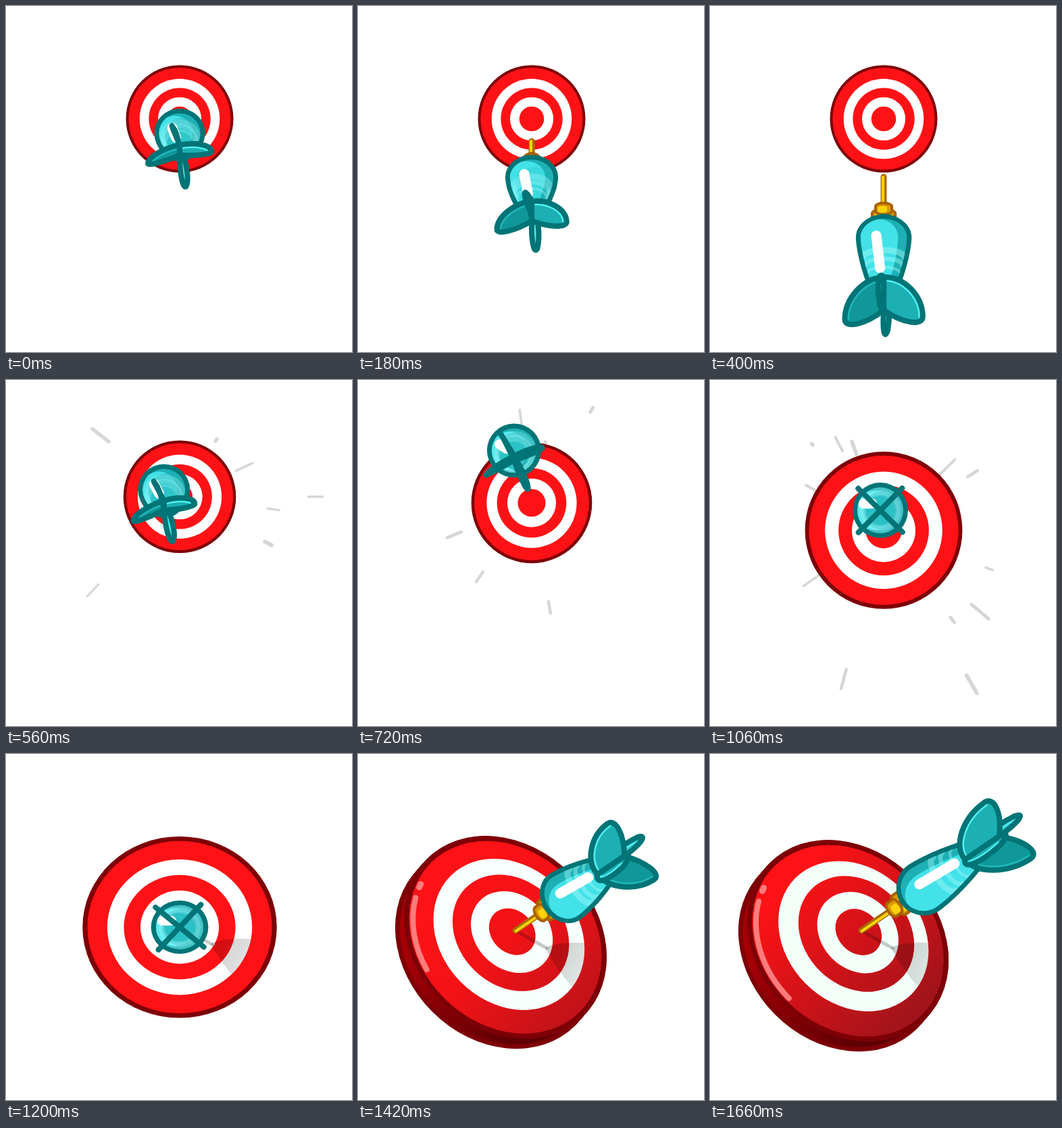
Write an HTML page with a canvas that moves like this. It is 512 px wide and 512 px high and loops after 1.68 s.

```html
<!DOCTYPE html>
<html lang="en">
<head>
<meta charset="utf-8">
<title>Dart and target</title>
<style>
  html, body { margin: 0; width: 100%; height: 100%; overflow: hidden; background: #fff; }
  canvas { display: block; width: 512px; height: 512px; }
</style>
</head>
<body>
<canvas id="stage" width="512" height="512"></canvas>
<script>
const ctx = document.getElementById('stage').getContext('2d');
const LOOP = 1680, STEP = 20, TAU = Math.PI * 2;
const TEAL = '#007476', MAROON = '#7d0006';
const HIT = 1130, LEAN = 1200, SETTLE = 1420;

const progress = (t, from, to) => Math.max(0, Math.min(1, (t - from) / (to - from)));
const ease = (t, from, to) => {
  const p = progress(t, from, to);
  return p * p * (3 - 2 * p);
};
const mix = (a, b, p) => a + (b - a) * p;

let seed = 7;
const rand = () => (seed = seed * 16807 % 2147483647) / 2147483647;
const between = (a, b) => mix(a, b, rand());

// Streaks fly outwards and stay clear of the stage edges
const streaks = Array.from({ length: 36 }, (_, i) => {
  const angle = i * 2.4;
  return {
    angle,
    time: between(540, 1090),
    dist: between(100, 190 + 70 * Math.sin(angle)),
    len: between(15, 38),
    width: between(3, 6)
  };
});

function targetPose(t) {
  const p = progress(t, 440, LEAN);
  const zoom = 59.5 * (.4 * p + .6 * p ** 3.5);
  const tilt = ease(t, LEAN, SETTLE);
  const settle = 1 - (1 - progress(t, SETTLE, 1660)) ** 2;
  return {
    x: 257 - 39 * tilt - 14 * settle,
    y: 167 + 1.5 * zoom + 15 * tilt + 5 * settle,
    radius: 79.5 + zoom + 25 * tilt - settle,
    ratio: 1 - .18 * tilt,
    squash: .034 * (ease(t, HIT, LEAN) - ease(t, LEAN, 1260)),
    shade: .65 * tilt + .35 * settle,
    tilt, settle
  };
}

function dartPose(t, { y: targetY, tilt, settle }) {
  const pull = ease(t, 0, 400) - ease(t, 400, 560);
  const rise = ease(t, 400, 880);
  const drop = ease(t, 880, HIT);
  const drift = ease(t, 400, 600) - drop;
  const spin = ease(t, LEAN, 1270);
  const flightY = 161 + 92 * pull - 93 * rise;
  return {
    x: 257 - 26 * drift - 24 * tilt - 9 * settle,
    y: mix(flightY, targetY, drop) - 10 * tilt - 5 * settle,
    length: .22 * (1 - rise * rise) + .51 * pull + .723 * tilt + .192 * settle,
    aspect: .92 + .08 * rise - .59 * pull - .6 * tilt,
    scale: .9 + .1 * rise + .11 * pull,
    finSize: 52 - 2 * rise + 10 * pull + 9 * tilt,
    heading: 1.57 - 2.17 * spin,
    roll: .2 - .1 * pull + .34 * rise + .31 * drop - 2.2 * spin,
    gloss: mix(11 + 14 * rise, -8, tilt)
  };
}

function fill(path, color) {
  ctx.fillStyle = color;
  ctx.fill(path);
}

function stroke(path, color, width) {
  ctx.strokeStyle = color;
  ctx.lineWidth = width;
  ctx.stroke(path);
}

function line(x1, y1, x2, y2, color, width) {
  const p = new Path2D();
  p.moveTo(x1, y1);
  p.lineTo(x2, y2);
  stroke(p, color, width);
}

function drawStreaks(t, cx, cy) {
  for (const s of streaks) {
    const p = (t - s.time) / 90;
    if (Math.abs(p) >= 1) continue;
    const from = s.dist + 35 * p, to = from + s.len * (1 - p * p);
    const c = Math.cos(s.angle), n = Math.sin(s.angle);
    line(cx + c * from, cy + n * from, cx + c * to, cy + n * to, '#d6d6d6', s.width);
  }
}

function drawTarget({ x, y, radius, ratio, tilt, settle, shade }, dart, shadow) {
  const face = radius * .95;
  const oval = (r, dx = 0, dy = 0, from = 0, to = TAU) => {
    const p = new Path2D();
    p.ellipse(x + dx, y + dy, r, r * ratio, Math.PI / 4, from, to);
    return p;
  };

  if (tilt > .01) {
    const side = ctx.createLinearGradient(x - 100, y, x + 20, y + 150);
    side.addColorStop(0, '#a30006');
    side.addColorStop(1, '#5e0004');
    for (const [r, color] of [[radius, MAROON], [radius * .955, side]]) {
      for (let i = 0; i <= 15; i++) fill(oval(r, -tilt * i * .87, tilt * i), color);
    }
  }
  fill(oval(radius), MAROON);

  const reach = face * .72;
  const shading = ctx.createLinearGradient(x - reach, y - reach, x + reach, y + reach);
  shading.addColorStop(.1, 'rgba(125,20,28,0)');
  shading.addColorStop(.5, `rgba(125,20,28,${.33 * shade ** 3})`);
  shading.addColorStop(1, `rgba(125,20,28,${.75 * shade})`);
  const white = `rgb(${255 - 11 * shade},255,${255 - 5 * shade})`;
  const ring = f => {
    const shift = shade * (1 - f ** 3);
    return oval(face * f, 16 * shift, -13 * shift);
  };
  [1, .785, .605, .425, .242].forEach((f, i) => {
    fill(ring(f), i % 2 ? white : '#ff1216');
    if (i % 2 === 0) fill(ring(f), shading);
  });

  if (shadow > 0) {
    ctx.save();
    ctx.clip(ring(.785));
    ctx.translate(dart.x, dart.y);
    ctx.globalAlpha = shadow;
    line(0, 0, 46, 26, 'rgba(0,0,0,.2)', 5);
    const wedge = new Path2D('M44 25Q75 12 130 22L98 98Q62 62 44 25Z');
    const soft = ctx.createLinearGradient(44, 25, 110, 60);
    soft.addColorStop(0, 'rgba(0,0,0,.2)');
    soft.addColorStop(1, 'rgba(0,0,0,.09)');
    fill(wedge, soft);
    ctx.restore();
  }

  if (tilt > .3) {
    ctx.globalAlpha = (tilt - .3) / .7;
    stroke(oval(face * .96, 0, 0, 1.9 - .32 * settle, 2.7), '#ff7c7c', 8);
    stroke(oval(face * .96, 0, 0, 2.83, 2.87), '#ff7c7c', 9);
    ctx.globalAlpha = 1;
  }
}

const BELLY = 122, TAIL = 252, GIRTH = 34;

function bodyRadius(u) {
  if (u < BELLY) return GIRTH * Math.sqrt(Math.max(0, 1 - ((BELLY - u) / GIRTH) ** 2));
  return GIRTH * (1 - .8 * ((u - BELLY) / (TAIL - BELLY)) ** 1.6);
}

function drawDart({ x, y, length: k, aspect: c, scale, finSize, heading, roll, gloss }) {
  // Solid of revolution: union of the projected rings
  const solid = (from, to, radius, grow = 0, dy = 0) => {
    const p = new Path2D();
    for (let i = 0; i <= 70; i++) {
      const u = mix(from, to, i / 70), r = radius(u) * scale;
      const rx = r * c + grow;
      p.moveTo(u * k + rx, dy);
      p.ellipse(u * k, dy, rx, r + grow, 0, 0, TAU);
    }
    return p;
  };

  ctx.save();
  ctx.translate(x, y);
  ctx.rotate(heading);

  const thin = Math.min(1, k * 4);
  line(0, 0, 60 * k, 0, '#a86c00', 9 * thin);
  line(0, 1, 60 * k, 1, '#ffd40a', 4 * thin);
  for (const [from, to, r] of [[74, 94, 15], [60, 69, 10]]) {
    fill(solid(from, to, () => r, 4), '#a86200');
    fill(solid(from, to, () => r), '#d99a04');
    fill(solid(from + 2, to, () => r * .7, 0, 2), '#ffd40a');
  }

  const front = BELLY - GIRTH;
  const body = solid(front, TAIL, bodyRadius);
  fill(solid(front, TAIL, bodyRadius, 7), TEAL);
  fill(body, '#1eb0b5');
  ctx.save();
  ctx.clip(body);
  fill(solid(front, TAIL, u => bodyRadius(u) * .86, 0, 8 * scale), '#42e2e8');
  if (c > .5) {
    ctx.globalAlpha = (c - .5) * 1.3;
    fill(solid(BELLY + 8, TAIL, u => bodyRadius(u) * .85, 0, -3), '#1eb0b5');
    ctx.globalAlpha = 1;
  }
  const half = Math.PI / 2 * (1 + c ** 4);
  for (let i = 0; i < 3; i++) {
    const u = 162 + 16 * i, r = bodyRadius(u) * scale, p = new Path2D();
    p.ellipse(u * k, 0, r * c, r, 0, Math.PI - half, Math.PI + half);
    stroke(p, `rgba(170,250,250,${.5 - .25 * c})`, 9 - 2.5 * i);
  }
  line(120 * k - 10 * c * (1 - k), gloss, 186 * k - 10 * c * (1 - k), gloss * .5, '#fff', 15);
  ctx.restore();

  [0, 1, 2, 3].map(i => roll + i * Math.PI / 2)
    .sort((a, b) => Math.cos(a) - Math.cos(b))
    .forEach((angle, rank) => drawFin(angle, rank, k, c, (finSize - 4) / 60));
  ctx.restore();
}

// Ranks run from the rear fin (0) to the one nearest the viewer (3)
function drawFin(angle, rank, k, c, size) {
  const sin = Math.sin(angle), cos = Math.cos(angle);
  const thick = 5 * Math.min(1, k * 5) * cos;
  const at = (u, r, side = 0) => [u * k - r * size * cos * c, r * size * sin + side * thick];
  const edge = new Path2D();
  edge.moveTo(...at(203, 0));
  edge.bezierCurveTo(...at(203, 32, 1), ...at(243, 60, 1), ...at(285, 60));
  const leaf = new Path2D(edge);
  leaf.bezierCurveTo(...at(306, 60, -1), ...at(298, 28, -1), ...at(270, 0));
  leaf.closePath();

  const shaded = rank % 3 !== 0 && sin > 0;
  fill(leaf, rank === 0 ? '#35cfd6' : shaded ? '#109799' : '#1cafb3');
  ctx.save();
  ctx.clip(leaf);
  stroke(edge, shaded ? '#20b8bc' : '#4ff0f2', 13);
  ctx.restore();
  stroke(leaf, TEAL, 8);
}

function draw(t) {
  const target = targetPose(t), dart = dartPose(t, target);
  const { x, y, squash } = target;
  ctx.clearRect(0, 0, 512, 512);
  ctx.lineCap = ctx.lineJoin = 'round';
  drawStreaks(t, x, y);
  ctx.save();
  ctx.translate(x, y);
  ctx.scale(1 + squash, 1 - squash);
  ctx.translate(-x, -y);
  drawTarget(target, dart, progress(t, HIT - 20, HIT + 40));
  drawDart(dart);
  ctx.restore();
}

const start = performance.now();
function tick() {
  const t = (performance.now() - start) % LOOP;
  draw(Math.floor(t / STEP) * STEP);
  requestAnimationFrame(tick);
}
tick();
</script>
</body>
</html>
```
